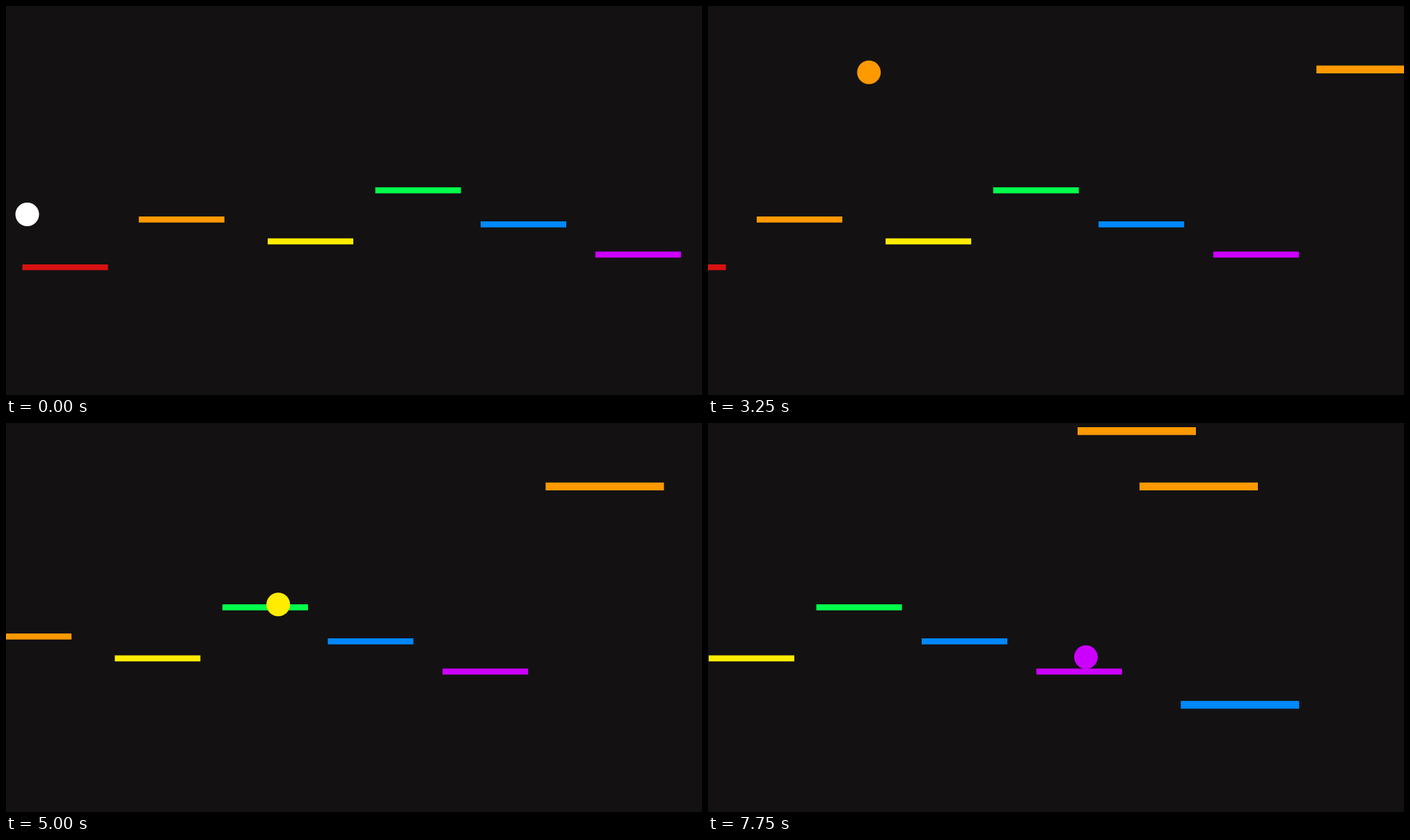
An HTML page with a canvas for the animation above (8 s loop, 1000 px wide and 560 px high).

```html
<!DOCTYPE html>
<html>
<head>
<meta charset="utf-8">
<title>Bouncing ball platformer</title>
<style>
  html, body { margin: 0; height: 100%; overflow: hidden; background: #131112; }
  canvas { display: block; }
</style>
</head>
<body>
<canvas id="stage" width="1000" height="560"></canvas>
<script>
const ctx = document.getElementById('stage').getContext('2d');

const LOOP = 8000, TICK = 250, START = 1500;
const SCROLL = 14.12, SCROLL_OFFSET = 22;   // pixels per tick, pixels at tick 0
const LAUNCH = 226, HALF_GRAVITY = 59.15;   // pixels per tick, per tick squared
const RADIUS = 17;

const RED = '#d81212', ORANGE = '#ff9900', YELLOW = '#ffec00',
      GREEN = '#00ff4b', BLUE = '#0088ff', PURPLE = '#cc00ff';

// x, y, width, height, colour, tick of appearance
const platforms = [
  [23.5, 372, 123, 8.3, RED],
  [190.8, 303, 123, 8.7, ORANGE],
  [376, 334.5, 123, 8.7, YELLOW],
  [530.6, 261, 123, 8.7, GREEN],
  [682, 310, 123, 8.7, BLUE],
  [846.8, 353.5, 123, 8.7, PURPLE],
  [995, 85.7, 170, 11.3, ORANGE, 7],
  [906, 6, 170, 11.3, ORANGE, 15],
  [1054.3, 400, 170, 11.3, BLUE, 23]
];

// The ball waits at x, y, takes off at one tick and lands at another.
const jumps = [
  { x: 30.5, y: 354.5, vx: 48.7, from: 1.24, to: 4.73, color: RED },
  { x: 200.6, y: 286, vx: 24.4, from: 5.745, to: 9.72, color: ORANGE },
  { x: 297.6, y: 322, vx: 26.5, from: 10.47, to: 14.05, color: YELLOW },
  { x: 392, y: 244.5, vx: 12.4, from: 14.7, to: 18.72, color: GREEN },
  { x: 442, y: 293, vx: 25.2, from: 20.9, to: 24.91, color: BLUE },
  { x: 543, y: 337, vx: 0, from: Infinity, to: Infinity, color: PURPLE }
];

function tickAt(ms) {
  if (ms < 500) return -SCROLL_OFFSET / SCROLL;
  if (ms < START) return -1;
  return Math.floor((ms - START) / TICK);
}

function ballAt(tick) {
  if (tick < 0) {
    const fall = tick + SCROLL_OFFSET / SCROLL;
    return { x: 30.5, y: 300 + HALF_GRAVITY * fall * fall, color: '#fff' };
  }
  const { x, y, vx, from, color } = jumps.find(jump => tick < jump.to);
  const air = Math.max(0, tick - from);
  return { x: x + vx * air, y: y - LAUNCH * air + HALF_GRAVITY * air * air, color };
}

function draw(now) {
  const tick = tickAt(now % LOOP);
  const shift = SCROLL_OFFSET + SCROLL * tick;

  ctx.fillStyle = '#131112';
  ctx.fillRect(0, 0, 1000, 560);
  for (const [x, y, w, h, color, born = -Infinity] of platforms) {
    if (tick < born) continue;
    ctx.fillStyle = color;
    ctx.fillRect(x - shift, y, w, h);
  }

  const ball = ballAt(tick);
  ctx.fillStyle = ball.color;
  ctx.beginPath();
  ctx.arc(ball.x, ball.y, RADIUS, 0, 2 * Math.PI);
  ctx.fill();
}

const begin = performance.now();
function loop() {
  draw(performance.now() - begin);
  requestAnimationFrame(loop);
}
loop();
</script>
</body>
</html>
```
